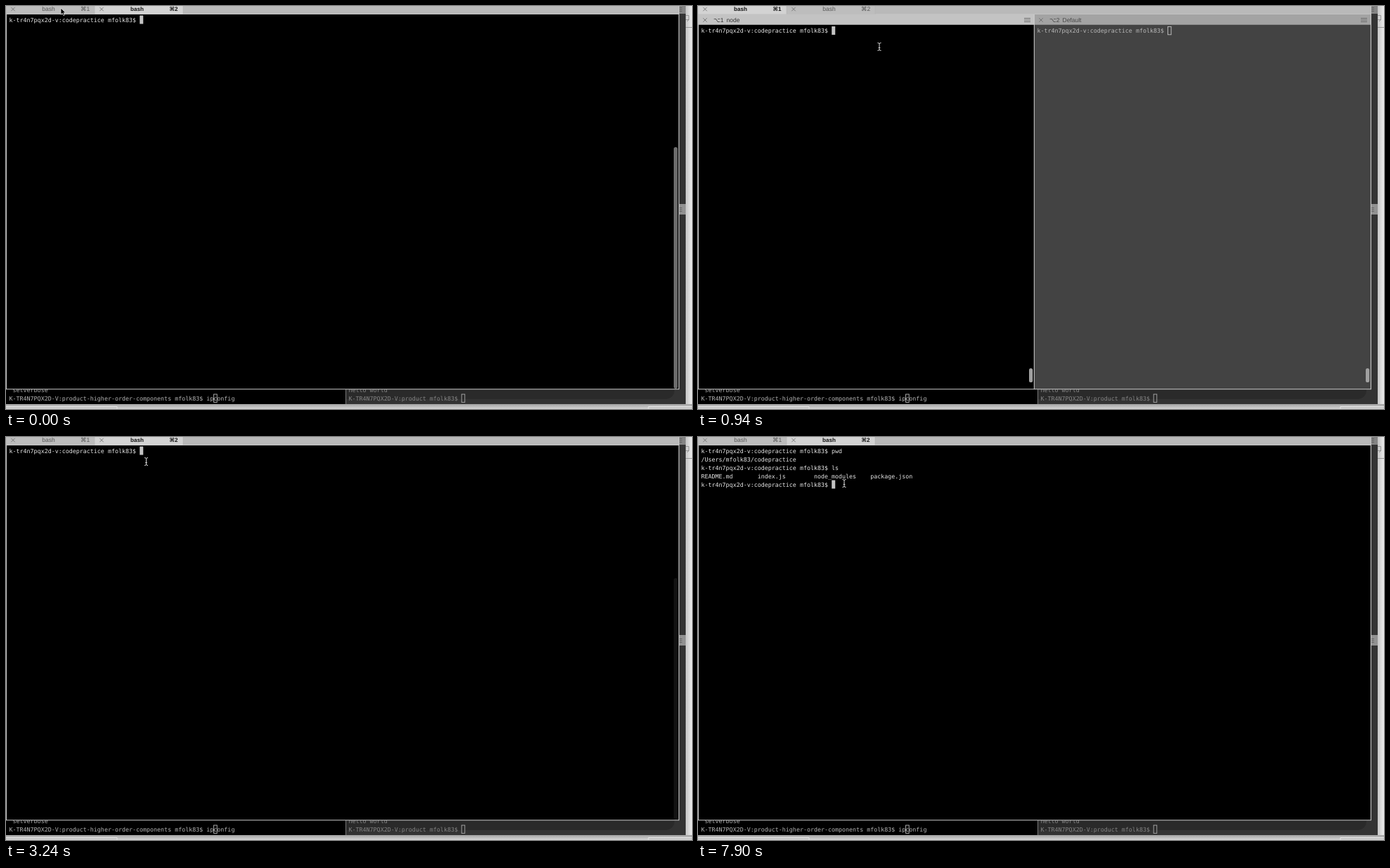
An HTML page that plays this animation: 976x574 px, repeating every 8 s.

```html
<!DOCTYPE html>
<html lang="en">
<head>
<meta charset="utf-8">
<title>Terminal tabs</title>
<style>
html, body { margin: 0; width: 100%; height: 100%; overflow: hidden; background: #000; }
svg { display: block; width: 976px; height: 574px; }
text { white-space: pre; text-rendering: geometricPrecision; }
.mono { font: 8.34px "DejaVu Sans Mono", monospace; }
.ui { font: 8.5px "Liberation Sans", "DejaVu Sans", sans-serif; }
</style>
</head>
<body>
<svg id="stage" viewBox="0 0 976 574" xmlns="http://www.w3.org/2000/svg">
  <defs>
    <linearGradient id="sideShade"><stop offset="0" stop-color="#c4c4c4"/><stop offset="1" stop-color="#ededed"/></linearGradient>
    <linearGradient id="footShade" x2="0" y2="1"><stop offset="0" stop-color="#a2a2a2"/><stop offset="1" stop-color="#d6d6d6"/></linearGradient>
    <clipPath id="footClip"><rect y="546" width="976" height="21"/></clipPath>
  </defs>
  <g id="back"></g>
  <g id="solo"></g>
  <g id="split"></g>
  <g id="tabs"></g>
  <g id="frame"></g>
  <g id="beam" fill="none">
    <path d="M-2.5-5.5Q0-5.5 0-4Q0-5.5 2.5-5.5M0-4V4M-2.5 5.5Q0 5.5 0 4Q0 5.5 2.5 5.5M-1.3 1.5H1.3" stroke="#d8d8d8"/>
  </g>
  <path id="arrow" d="M0 0V9.3L2.2 7.3L3.8 10.7L5.4 10L3.9 6.7H6.8Z" fill="#000" stroke="#eee" stroke-width=".7"/>
</svg>
<script>
const LOOP = 8000, CHAR = 5.02, LEFT = 4.5;
const HOST = "k-tr4n7pqx2d-v", USER = "mfolk83", DIR = "codepractice";
const PROMPT = `${HOST}:${DIR} ${USER}$ `;
const $ = id => document.getElementById(id);

function add(parent, tag, attrs, content) {
  const el = document.createElementNS("http://www.w3.org/2000/svg", tag);
  for (const key in attrs) el.setAttribute(key, attrs[key]);
  if (content !== undefined) el.textContent = content;
  return parent.appendChild(el);
}
const set = (el, attrs) => { for (const key in attrs) el.setAttribute(key, attrs[key]); };
const rect = (p, x, y, width, height, fill, more) => add(p, "rect", { x, y, width, height, fill, ...more });
const line = (p, d, stroke, width = 1) => add(p, "path", { d, stroke, fill: "none", "stroke-width": width });
const mono = (p, x, y, fill, s = "") => add(p, "text", { x, y, fill, class: "mono" }, s);
const label = (p, x, y, s, more) => add(p, "text", { x, y, class: "ui", ...more }, s);
const cross = (p, x, y) => line(p, `M${x - 2.7} ${y - 2.7}l5.4 5.4m0-5.4l-5.4 5.4`, "#666", .8);
const hollow = (p, x, y, stroke) => rect(p, x, y, 4.6, 11.4, "none", { stroke, "stroke-width": .9 });
const grip = (p, x, y) => line(p, `M${x - 2} ${y - 2.5}h4m-4 2.5h4m-4 2.5h4`, "#555", .7);

function buildBack(g) {
  rect(g, 0, 0, 976, 574, "#d6d6d6");
  rect(g, 967, 0, 9, 574, "url(#sideShade)");
  rect(g, 0, 567, 976, 7, "url(#footShade)");
  line(g, "M0 570.5H158V574M976 570.5H914V574", "#e6e6e6");
  line(g, "M967 13.5H971.5V19.5H967M969 22L972 19M967 30.5H976", "#888", .8);
  rect(g, 957, 0, 10, 567, "#343434");
  rect(g, 957, 0, 10, 11, "#858585");
  grip(g, 960, 5);
  rect(g, 957, 282, 10, 15, "#929292");
  grip(g, 960, 290);
  rect(g, 0, 546, 483, 21, "#000");
  rect(g, 484, 546, 483, 21, "#333");
  add(g, "path", { d: "M484 546H951Q951 559 938 560H484Z", fill: "#2a2a2a" });
  line(g, "M483.5 546V567", "#777");
  const foot = add(g, "g", { "clip-path": "url(#footClip)" });
  const host = HOST.toUpperCase();
  mono(foot, LEFT + CHAR, 550, "#aaa", "setverbose");
  mono(foot, LEFT, 562, "#b4b4b4", `${host}:product-higher-order-components ${USER}$ ipconfig`);
  hollow(foot, 295.6, 553, "#bbb");
  mono(foot, 487.5, 550, "#858585", "hello world");
  mono(foot, 487.5, 562, "#858585", `${host}:product ${USER}$ `);
  hollow(foot, 648.2, 553, "#aaa");
}

function buildSolo(g) {
  rect(g, 0, 12, 957, 534, "#000");
  const rows = [0, 1, 2, 3, 4].map(i => mono(g, LEFT, 22.8 + i * 12, "#e4e4e4"));
  const caret = rect(g, 0, 0, 5, 12, "#c4c4c4");
  const bar = rect(g, 950, 201, 5.4, 344, "#6c6c6c", { rx: 2.7 });
  return { rows, caret, bar };
}

function buildPane(g, x, width, key, name) {
  const head = rect(g, x, 12, width, 15, "#aaa");
  const body = rect(g, x, 27, width, 519, "#000");
  line(g, `M${x} 26.5h${width}`, "#777", .6);
  cross(g, x + 10, 20);
  const names = [label(g, x + 22, 23, key), label(g, x + 40.5, 23, name)];
  line(g, `M${x + width - 14} 17.5h9m-9 2.5h9m-9 2.5h9`, "#666", .9);
  const text = mono(g, x + 4.5, 38.3, "#eee", PROMPT);
  const caretX = x + 4.5 + PROMPT.length * CHAR;
  const full = rect(g, caretX, 29, 5, 12, "#c4c4c4");
  const empty = hollow(g, caretX + .3, 29.4, "#c4c4c4");
  const bar = rect(g, x + width - 7, 516, 5.2, 20, "#a0a0a0", { rx: 2.6 });
  return { bar, show(active) {
    set(head, { fill: active ? "#c3c3c3" : "#a3a3a3" });
    set(body, { fill: active ? "#000" : "#434343" });
    set(text, { fill: active ? "#e4e4e4" : "#b8b8b8" });
    names.forEach(n => set(n, { fill: active ? "#333" : "#484848" }));
    set(full, { opacity: active ? 1 : 0 });
    set(empty, { opacity: active ? 0 : 1 });
  } };
}

function buildTab(g, x, key) {
  const back = rect(g, x, 0, 126, 11.5, "#bbb");
  cross(g, x + 10, 4.5);
  const names = [["bash", 60.5], [key, 112.5]].map(([s, dx]) => label(g, x + dx, 7.4, s, { "text-anchor": "middle" }));
  return active => {
    set(back, { fill: active ? "#d3d3d3" : "#bdbdbd" });
    names.forEach(n => set(n, { fill: active ? "#111" : "#555", "font-weight": active ? 700 : 400,
      style: active ? "font-weight:700;font-size:8.1px" : "" }));
  };
}

buildBack($("back"));
const solo = buildSolo($("solo"));
const left = buildPane($("split"), 0, 478, "⌥1", "node");
const right = buildPane($("split"), 478, 479, "⌥2", "Default");
line($("split"), "M478.3 12V546", "#d0d0d0");
rect($("tabs"), 0, 0, 957, 11.7, "#b9b9b9");
const tabs = [buildTab($("tabs"), 0, "⌘1"), buildTab($("tabs"), 126, "⌘2")];
line($("tabs"), "M126 0V11.5M252 0V11.5", "#adadad", .5);
line($("frame"), "M.5 12V545.7H957.4V0", "#c9c9c9", 1.1);

// Pointer stops: time, x, y
const pointer = [
  [0, 78, 3], [150, 92, 9], [350, 165, 34], [540, 236, 54], [740, 257.5, 58], [940, 258, 58],
  [2640, 243, 44], [2790, 211, 16], [2940, 200, 3.5], [3240, 199.5, 35], [3390, 203, 46],
  [3580, 209, 55], [3780, 211, 57], [6270, 204, 64], [6420, 190, 73], [6570, 180, 84],
  [6720, 185, 93], [6870, 199, 96], [7010, 215, 95], [7160, 230, 91], [7310, 241, 92],
  [7450, 258, 98], [7600, 265, 94], [7750, 232, 78], [7900, 208, 66]
];
// Scroll bar fades: time, opacity
const soloFade = [[0, 1], [3240, .17], [3390, .6], [3580, 1], [4260, .7], [4420, .3], [4580, 0]];
const splitFade = [[0, .4], [350, 1], [1270, .7], [1430, .35], [1590, 0]];
// Text typed at each prompt: time, text
const firstCommand = [[0, ""], [4260, "pw"], [4420, "pwd"]];
const secondCommand = [[0, ""], [5650, "l"], [5810, "ls"]];

const at = (steps, t) => steps.filter(s => s[0] <= t).pop();

function screen(t) {
  const lines = [PROMPT + at(firstCommand, t)[1]];
  if (t >= 4580) lines.push(`/Users/${USER}/${DIR}`, PROMPT + at(secondCommand, t)[1]);
  if (t >= 5980) lines.push(["README.md", "index.js", "node_modules", "package.json"].map(s => s.padEnd(16)).join(""), PROMPT);
  return lines;
}

function draw(t) {
  const isSplit = t >= 150 && t < 3240;
  set($("solo"), { display: isSplit ? "none" : "inline" });
  set($("split"), { display: isSplit ? "inline" : "none" });
  tabs[0](isSplit);
  tabs[1](!isSplit);

  const lines = screen(t), last = lines.length - 1;
  solo.rows.forEach((row, i) => { row.textContent = lines[i] || ""; });
  set(solo.caret, { x: LEFT + lines[last].length * CHAR, y: 13.5 + last * 12 });
  set(solo.bar, { opacity: at(soloFade, t)[1] });

  left.show(t >= 940);
  right.show(t < 940);
  for (const pane of [left, right]) set(pane.bar, { opacity: at(splitFade, t)[1] });

  const [, x, y] = at(pointer, t);
  const overText = y > (isSplit ? 27 : 12);
  const place = { transform: `translate(${x} ${y})` };
  set($("beam"), { ...place, display: overText ? "inline" : "none" });
  set($("arrow"), { ...place, display: overText ? "none" : "inline" });
}

const start = performance.now();
function tick() {
  draw((performance.now() - start) % LOOP);
  requestAnimationFrame(tick);
}
tick();
</script>
</body>
</html>
```
